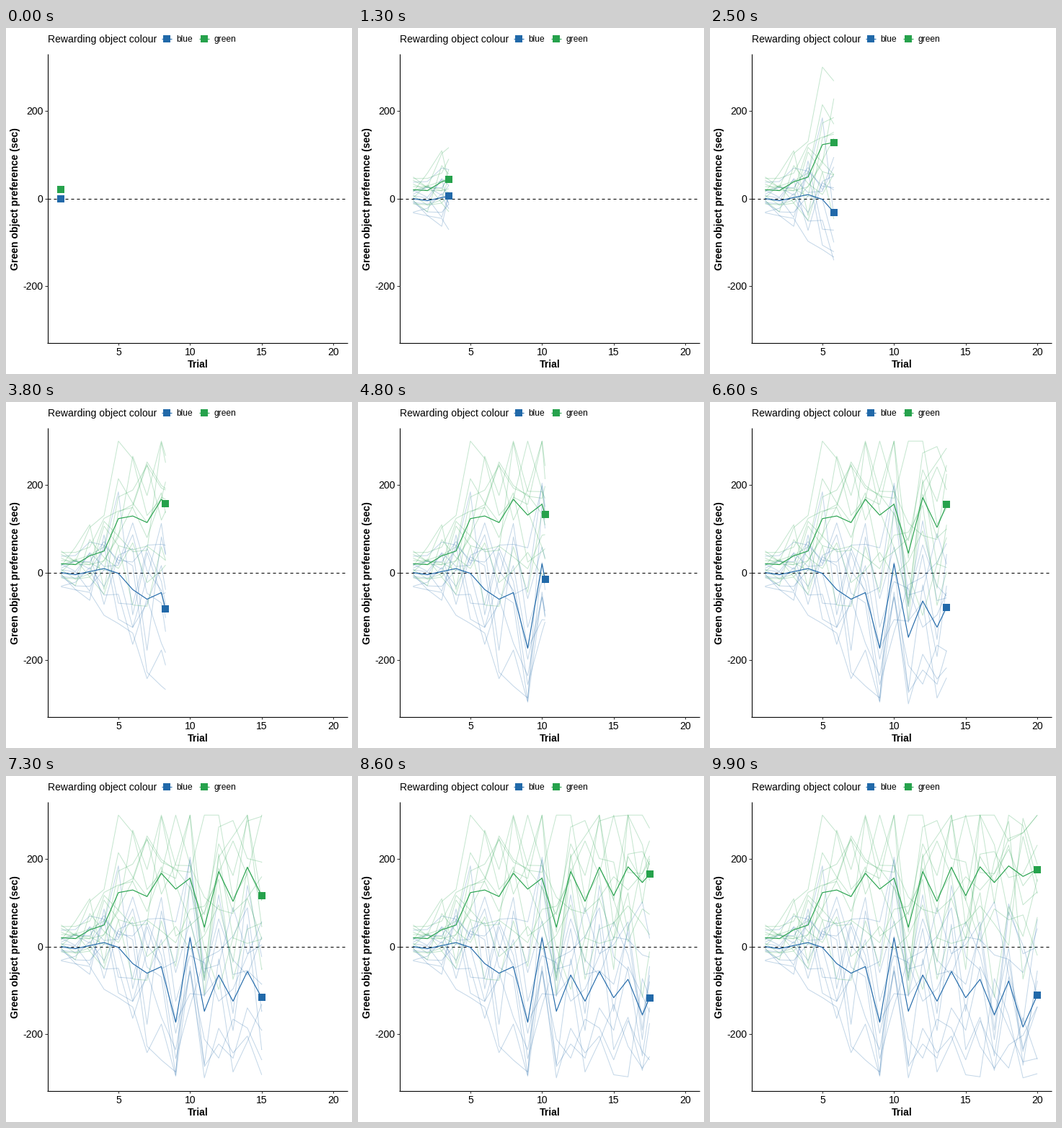
These frames come from a looping animation (480x480 px, 10000 ms). A matplotlib script:

```python
import numpy as np
import matplotlib.pyplot as plt
from matplotlib.animation import FuncAnimation
from matplotlib.patches import Rectangle

plt.rcParams["font.family"] = "Liberation Sans"

SIZE, DPI = 480, 100
PX = 72 / DPI
FRAMES, INTERVAL = 100, 100
PER_GROUP, LIMIT = 11, 300
TRIALS = np.arange(1, 21)
LEFT, RIGHT, TOP, BOTTOM, ZERO = 57.5, 473, 36, 436.5, 236.5
MARK, THIN = 10, 1.07

# Mean preference per trial: the key points of the two main curves
GROUPS = {
    "blue": dict(
        color="#2169a9", seed=8, legend=222.7,
        mean=[0, -5, 2, 9, -2, -39, -61, -46, -173, 20,
              -148, -65, -125, -57, -117, -75, -156, -79, -184, -111]),
    "green": dict(
        color="#26a24c", seed=5, legend=274.7,
        mean=[20, 18, 38, 49, 123, 129, 114, 167, 131, 156,
              44, 171, 103, 181, 116, 182, 146, 184, 160, 176]),
}


def px_x(trial):
    return LEFT + (np.asarray(trial) - 0.05) * (RIGHT - LEFT) / 20.9


def px_y(value):
    return ZERO - np.asarray(value) * 0.6075


def subjects(mean, seed):
    """Individual series that scatter ever wider around the group mean."""
    rng = np.random.default_rng(seed)
    spread = 20 + 95 * (1 - np.exp(-((TRIALS - 1) / 4) ** 2))
    habit = rng.normal(size=(PER_GROUP, 1))
    score = 0.6 * habit + 0.8 * rng.normal(size=(PER_GROUP, TRIALS.size))
    score = (score - score.mean(axis=0)) / score.std(axis=0)
    return np.clip(mean + spread * score, -LIMIT, LIMIT)


fig = plt.figure(figsize=(SIZE / DPI, SIZE / DPI), dpi=DPI, facecolor="white")
ax = fig.add_axes([0, 0, 1, 1])
ax.set(xlim=(0, SIZE), ylim=(SIZE, 0))
ax.axis("off")


def line(xs, ys, color="black", width=THIN, **kw):
    return ax.plot(xs, ys, color=color, lw=width * PX,
                   solid_capstyle="butt", **kw)[0]


def label(x, y, s, size=14, **kw):
    kw.setdefault("va", "baseline")
    ax.text(x, y, s, fontsize=size * PX, **kw)


def corner(x, y):
    return x - MARK / 2, y - MARK / 2


def square(x, y, color):
    return ax.add_patch(Rectangle(corner(x, y), MARK, MARK,
                                  fc=color, ec="none", zorder=5))


# Axes
line([LEFT, LEFT], [TOP, BOTTOM + 0.5])
line([LEFT - 0.5, RIGHT + 0.5], [BOTTOM, BOTTOM])
for v in (-200, 0, 200):
    line([LEFT - 3.5, LEFT], [px_y(v)] * 2, "#333333")
    label(51.3, px_y(v) + 5, str(v), ha="right")
for t in (5, 10, 15, 20):
    line([px_x(t)] * 2, [BOTTOM, BOTTOM + 3.5], "#333333")
    label(px_x(t), 454.3, str(t), ha="center")
label(265.8, 471, "Trial", ha="center", weight="bold")
label(20.4, 237, "Green object preference (sec)", rotation=90,
      ha="right", va="center", weight="bold")
dash = 4 / THIN
line([LEFT, RIGHT], [ZERO, ZERO], ls=(0, (dash, dash)),
     dash_capstyle="butt", zorder=1)

# Legend
label(57.5, 20, "Rewarding object colour")
for name, g in GROUPS.items():
    x = g["legend"]
    line([x - 7, x + 7], [14.5, 14.5], g["color"])
    square(x, 14.5, g["color"])
    label(x + 14, 19, name, size=12)

# Data series
series, markers = [], []
for g in GROUPS.values():
    mean = np.array(g["mean"])
    for values in subjects(mean, g["seed"]):
        faint = line([], [], g["color"], 1, alpha=0.27, zorder=2)
        series.append((faint, values))
    series.append((line([], [], g["color"], 1.15, zorder=3), mean))
    markers.append((square(0, 0, g["color"]), mean))


def update(i):
    now = 1 + 19 * i / (FRAMES - 1)
    seen = np.append(TRIALS[TRIALS < now], now)
    xs = px_x(seen)
    for artist, values in series:
        artist.set_data(xs, px_y(np.interp(seen, TRIALS, values)))
    for patch, mean in markers:
        patch.set_xy(corner(xs[-1], px_y(np.interp(now, TRIALS, mean))))
    return [artist for artist, _ in series + markers]


anim = FuncAnimation(fig, update, frames=FRAMES, interval=INTERVAL,
                     repeat=True, repeat_delay=0, blit=False)
plt.show()
```
